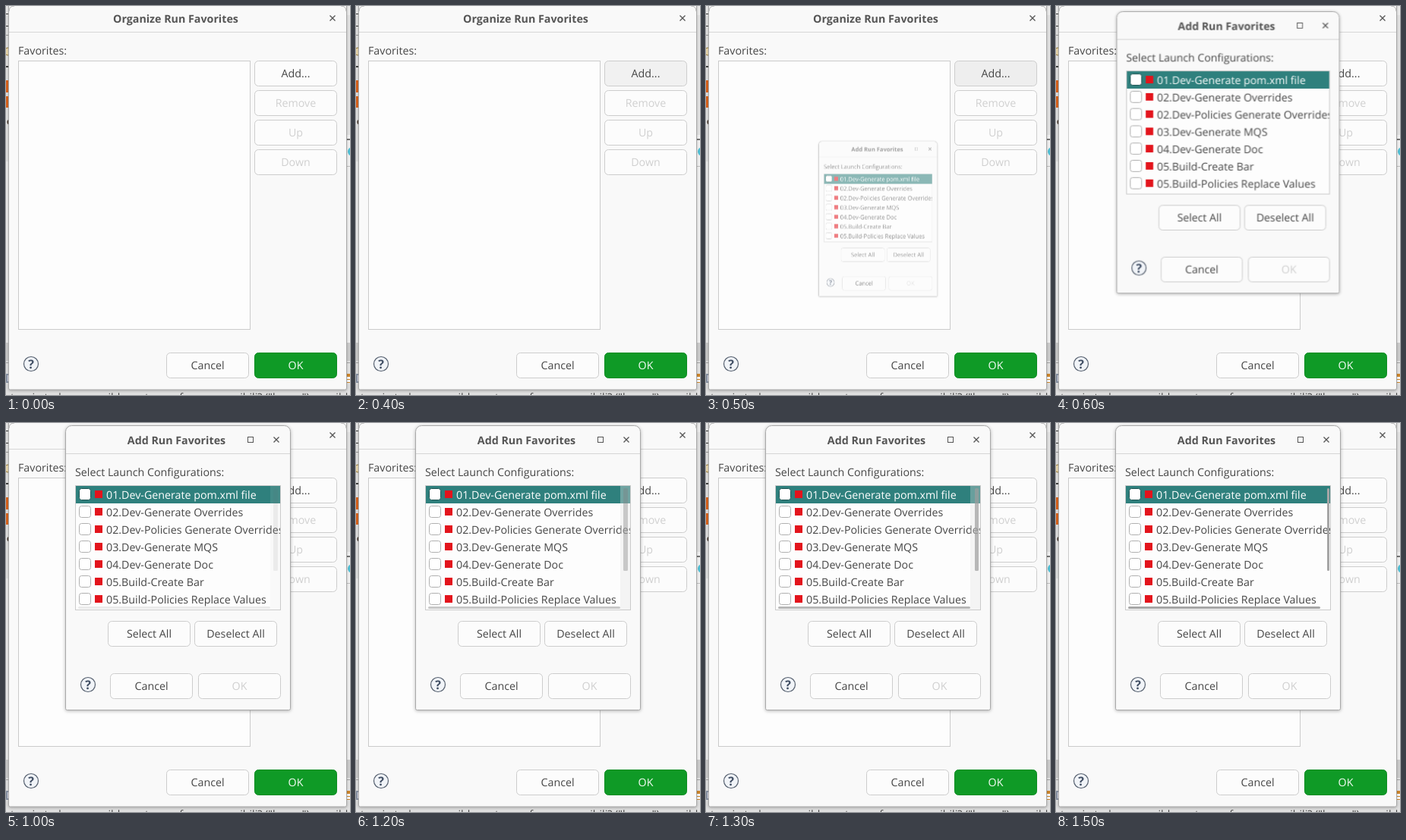
These frames come from a looping animation (453 by 513 pixels, 4800 ms). An HTML page:

```html
<!DOCTYPE html>
<html lang="en">
<head>
<meta charset="utf-8">
<title>Run Favorites</title>
<style>
html, body { margin: 0; width: 100%; height: 100%; overflow: hidden; background: #e9e9e9; }
svg { display: block; width: 453px; height: 513px; }
text { font: 14.25px "Open Sans", "Noto Sans", sans-serif; fill: #464646; text-rendering: geometricPrecision; white-space: pre; }
.title { font-weight: 700; fill: #555; }
.mid { text-anchor: middle; }
.btn rect { fill: #fcfcfc; stroke: #cdcdcd; }
.btn.off text { fill: #d0d0d0; }
.btn.ok rect { fill: #0f9a26; stroke: #0d8c22; }
.btn.ok text { fill: #f4fbf5; }
.icon { fill: none; stroke: #555; stroke-width: 1.3; }
.win { fill: #f9f9f9; stroke: #a9a9a9; filter: drop-shadow(0 1px 2px rgba(0, 0, 0, .28)); }
.line { stroke: #d6d6d6; }
.box { fill: #fdfdfd; stroke: #cbcbcb; }
.help { font-size: 16px; fill: #3f4d63; }

/* 4800 ms loop, 100 ms = 2.08333% */
.add rect, #dialog, #bars, #vbar, #track { animation: 4800ms step-end infinite; }
.add rect { animation-name: hover; }
#dialog { transform-origin: 226.5px 388px; animation-name: open; }
#bars { animation-name: reveal; }
#vbar { animation-name: slim; }
#track { animation-name: track; }

@keyframes hover {
  0% { fill: #fcfcfc; }
  8.3333% { fill: #f1f1f1; }
  10.4167% { fill: #eeeeee; }
  12.5%, 100% { fill: #fcfcfc; }
}
@keyframes open {
  0% { opacity: 0; transform: scale(.5); }
  10.4167% { opacity: .55; transform: scale(.528, .545); }
  12.5% { opacity: 1; transform: scale(.99); }
  14.5833%, 100% { opacity: 1; transform: none; }
}
@keyframes reveal {
  0% { opacity: 0; }
  20.8333% { opacity: .2; }
  22.9167% { opacity: .4; }
  25% { opacity: .6; }
  27.0833% { opacity: .8; }
  29.1667%, 100% { opacity: 1; }
}
@keyframes slim {
  0% { x: 352px; width: 6px; }
  27.0833% { x: 354px; width: 5px; }
  29.1667% { x: 356px; width: 4px; }
  31.25%, 100% { x: 357px; width: 3px; }
}
@keyframes track {
  0% { opacity: .6; }
  27.0833% { opacity: .4; }
  29.1667% { opacity: .15; }
  31.25%, 100% { opacity: 0; }
}
</style>
</head>
<body>
<svg id="stage" viewBox="0 0 453 513"></svg>
<script>
const rect = (x, y, w, h, attrs = '') =>
  `<rect x="${x}" y="${y}" width="${w}" height="${h}" ${attrs}/>`;
const fill = (x, y, w, h, color) => rect(x, y, w, h, `fill="${color}"`);
const text = (x, y, label, cls = '') => `<text x="${x}" y="${y}" class="${cls}">${label}</text>`;
const hline = (x1, x2, y) => `<path class="line" d="M${x1} ${y}H${x2}"/>`;
const cross = (x, y) => `<path class="icon" d="M${x - 3.5} ${y - 3.5}l7 7m0-7l-7 7"/>`;

const button = (x, y, label, cls = '') => `<g class="btn ${cls}">
  ${rect(x + .5, y + .5, 108, 33, 'rx="5"')}${text(x + 54.5, y + 22, label, 'mid')}</g>`;

const help = (x, y) => `<circle cx="${x}" cy="${y}" r="9.5" fill="#f1f4f8" stroke="#56606f" stroke-width="1.2"/>
  ${text(x, y + 6, '?', 'mid title help')}`;

const backdrop = () => [
  fill(0, 0, 453, 12, '#f3f3f3'),
  fill(0, 10, 4, 1, '#333'), fill(0, 26, 4, 1, '#333'), fill(0, 38, 4, 1, '#999'),
  '<circle cx="3" cy="60" r="5" fill="#f1dfb4" stroke="#9a7b35"/>',
  fill(0, 79, 4, 2, '#444'),
  fill(0, 98, 4, 16, '#e2681f'), fill(0, 119, 4, 15, '#e2681f'),
  '<circle cx="5" cy="153" r="3.5" fill="#3b2a20"/>',
  fill(0, 205, 4, 239, '#f4f4f4'),
  fill(447, 170, 6, 274, '#f8f8f8'), fill(449, 175, 4, 2, '#777'),
  '<circle cx="456" cy="192" r="6" fill="#4fc3d9"/>',
  fill(447, 211, 6, 1, '#c4c4c4'),
  fill(0, 444, 453, 24, '#d2d2d2'), fill(0, 470, 453, 1, '#a9a9a9'),
  fill(0, 485, 4, 12, '#8d99ab'), fill(2, 487, 2, 8, '#eef'),
  fill(446, 485, 7, 12, '#d48a2c'), fill(449, 489, 4, 3, '#fff'), fill(449, 493, 4, 3, '#fff'),
  fill(0, 499, 453, 14, '#e2e2e2'),
  text(6, 521, 'to wi ntodo as possible systems of some possibili? (&quot;horus&quot;) possible t')
].join('');

const mainWindow = () => [
  '<path class="win" d="M3.5-5H448.5V504a2 2 0 0 1-2 2H5.5a2 2 0 0 1-2-2z"/>',
  '<path d="M4 7Q4 0 11 0M448 7Q448 0 441 0" fill="none" stroke="#b5b5b5"/>',
  hline(4, 448, 34.5),
  text(223.5, 22, 'Organize Run Favorites', 'title mid'), cross(430, 16),
  text(16, 64, 'Favorites:'),
  rect(16.5, 72.5, 305, 354, 'class="box"'),
  button(327, 72, 'Add...', 'add'),
  ...['Remove', 'Up', 'Down'].map((label, i) => button(327, 111 + 39 * i, label, 'off')),
  help(33, 472),
  button(211, 457, 'Cancel'), button(327, 457, 'OK', 'ok')
].join('');

const configs = [
  '01.Dev-Generate pom.xml file', '02.Dev-Generate Overrides',
  '02.Dev-Policies Generate Overrides', '03.Dev-Generate MQS',
  '04.Dev-Generate Doc', '05.Build-Create Bar', '05.Build-Policies Replace Values'
];

const row = (label, i) => {
  const y = 83 + 23 * i;
  return (i ? '' : fill(92, y, 270, 23, '#2f807d')) +
    rect(96.5, y + 3.5, 15, 15, `rx="3" fill="#fff" stroke="${i ? '#b0b0b0' : '#1f5553'}"`) +
    fill(117, y + 6, 10, 10, '#e3141c') +
    `<text x="132" y="${y + 17}"${i ? '' : ' style="fill:#fff"'}>${label}</text>`;
};

const scrollbars = () => `<g id="bars">
  ${rect(348, 83, 13, 163, 'id="track" fill="#e4e4e4"')}
  ${rect(352, 86, 6, 109, 'id="vbar" rx="1.5" fill="#a6a6a6"')}
  ${rect(95, 242, 253, 3, 'rx="1.5" fill="#a6a6a6"')}</g>`;

const dialog = () => `<g id="dialog">${[
  '<path class="win" d="M78.5 11.5a8 8 0 0 1 8-8H366.5a8 8 0 0 1 8 8V376.5a2 2 0 0 1-2 2H80.5a2 2 0 0 1-2-2z"/>',
  hline(79, 374, 40.5),
  text(224.5, 28, 'Add Run Favorites', 'title mid'),
  rect(318.5, 18.5, 7, 7, 'class="icon" style="stroke-width:1"'), cross(356, 22),
  text(91, 70, 'Select Launch Configurations:'),
  rect(91.5, 82.5, 270, 164, 'class="box"'),
  '<clipPath id="list"><path d="M92 83H361V246H92z"/></clipPath>',
  `<g clip-path="url(#list)">${configs.map(row).join('')}${scrollbars()}</g>`,
  button(134, 261, 'Select All'), button(248, 261, 'Deselect All'),
  help(108, 345),
  button(137, 330, 'Cancel'), button(253, 330, 'OK', 'off')
].join('')}</g>`;

document.getElementById('stage').innerHTML = backdrop() + mainWindow() + dialog();
</script>
</body>
</html>
```
